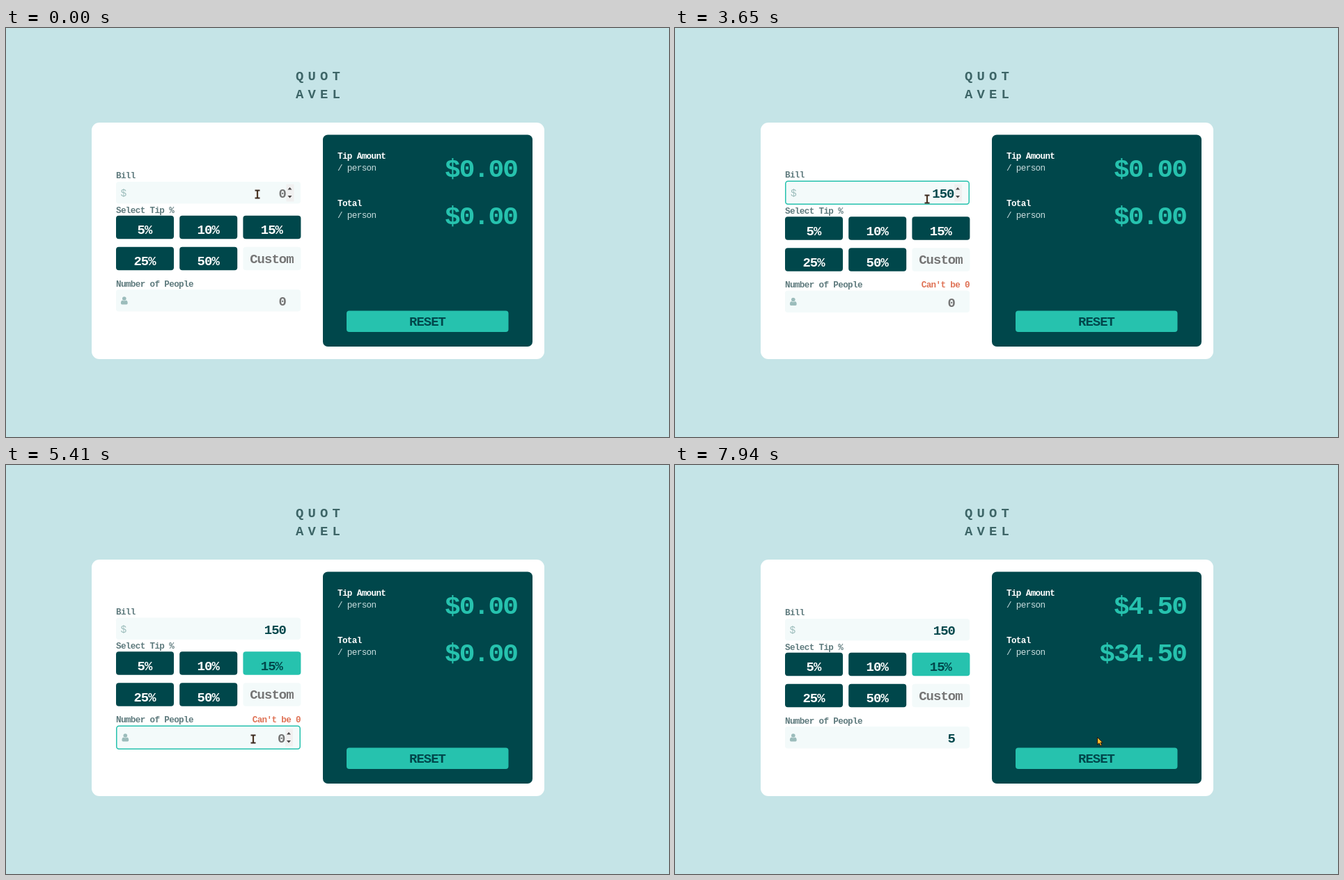
An HTML page with a canvas that plays this animation: 952 by 588 pixels, repeating every 8 s.

```html
<!DOCTYPE html>
<html lang="en">
<head>
<meta charset="utf-8">
<title>Tip calculator</title>
<style>
html, body { margin: 0; width: 100%; height: 100%; overflow: hidden; background: #c5e4e7; }
canvas { display: block; }
</style>
</head>
<body>
<canvas id="stage" width="952" height="588"></canvas>
<script>
const ctx = document.getElementById('stage').getContext('2d');
const LOOP = 8000;
const DARK = '#00474b', CYAN = '#26c2ae', PALE = '#f3fafa', LIGHT = '#9fe8df',
      LABEL = '#5e7a7d', ICON = '#9bbcbb', HINT = '#757575', ERROR = '#df7255';
const SMALL = 12.6, MEDIUM = 18.9, LARGE = 37.8;

// Stepped tracks: [start, ...values], each held until the next entry
const pointer = [
  [0, 'beam', 361, 239], [50, 'beam', 362, 238.5],
  [3650, 'beam', 362, 246], [3730, 'arrow', 362, 258], [3810, 'hand', 364, 295],
  [4290, 'hand', 363, 299], [4360, 'beam', 360, 335], [4440, 'beam', 357, 388],
  [4510, 'arrow', 353, 412], [4680, 'beam', 355, 402], [4750, 'beam', 355, 396],
  [4840, 'beam', 355, 394], [6670, 'beam', 385, 391], [6740, 'arrow', 440, 385],
  [6810, 'arrow', 520, 376], [6880, 'arrow', 590, 368], [6950, 'arrow', 614, 365],
  [7450, 'arrow', 615, 364], [7940, 'arrow', 606, 391]
];
const focus = [[0, ''], [50, 'bill'], [3880, ''], [4840, 'people'], [7520, '']];
const hover = [[0, 'bill'], [3730, ''], [4440, 'people'], [4510, ''], [4680, 'people'], [6740, '']];
const bill = [[0, ''], [2070, '1'], [2840, '15'], [2940, '150']];
const caret = [[0, 0], [110, 1], [630, 0], [1200, 1], [1660, 0], [2070, 1], [3490, 0],
  [4840, 1], [5410, 0], [5730, 1], [6230, 0], [6740, 1], [7280, 0]];

const at = (track, t) => track.findLast(k => k[0] <= t).slice(1);
const between = (t, a, b) => t >= a && t < b;

function box(x, y, w, h, r, fill) {
  ctx.fillStyle = fill;
  ctx.beginPath();
  ctx.roundRect(x, y, w, h, r);
  ctx.fill();
}

function text(str, x, y, size, color, align = 'left', weight = 'bold', tracking = -0.05) {
  ctx.font = `${weight} ${size}px "Liberation Mono", monospace`;
  ctx.letterSpacing = tracking * size + 'px';
  ctx.textAlign = align;
  ctx.fillStyle = color;
  ctx.fillText(str, x, y);
}

function shape(path, fill, stroke, width = 1) {
  const p = new Path2D(path);
  ctx.lineJoin = 'round';
  ctx.lineWidth = width;
  ctx.fillStyle = fill;
  ctx.strokeStyle = stroke;
  ctx.fill(p);
  if (stroke) ctx.stroke(p);
}

function drawPointer([kind, x, y]) {
  ctx.save();
  ctx.translate(x, y);
  if (kind === 'beam') {
    shape('M-3.5-5.5H3.5M0-5.5V5.5M-3.5 5.5H3.5', 'transparent', '#3d2b20', 2.2);
    shape('M0-4V4', 'transparent', '#7a5632', 0.6);
  } else if (kind === 'arrow') {
    shape('M.5.5V11L3 8.8 4.8 12.6 6.8 11.7 5.1 8.1H8.3Z', '#ffb92e', '#24180c');
  } else {
    shape('M-3-7Q-1.7-7.6-1.2-6L-.2-2.5 4-1.7Q6.4-1 6.2 1L5.6 4.5V7.5H-2V5.2L-5.3 1.6Q-5.6 0-4 0L-2 1.2-4-5.6Q-4.1-6.6-3-7Z',
      '#ffbc2d', '#33220f', 1.1);
  }
  ctx.restore();
}

function field(y, value, icon, focused, hovered, caretOn) {
  const inset = focused ? 1.5 : 0, right = 402 - inset;
  box(158, y, 265, 31.5 + inset * 2, 4, PALE);
  if (focused) {
    ctx.strokeStyle = CYAN;
    ctx.lineWidth = 1.5;
    ctx.beginPath();
    ctx.roundRect(158.75, y + 0.75, 263.5, 33, 3.5);
    ctx.stroke();
  }
  const top = y + inset;
  icon(inset, top);
  text(value || '0', right, top + 23, MEDIUM, value ? DARK : HINT, 'right');
  if (focused || hovered) {
    ctx.save();
    ctx.translate(right + 5.5, top);
    box(-5, 3.5, 11, 25, 0, '#f0f0f0');
    shape('M-3 11.5L0 8 3 11.5ZM-3 20L0 23.5 3 20Z', '#4a4646');
    ctx.restore();
  }
  if (focused && caretOn) box(400, top + 3, 1, 26, 0, DARK);
}

function dollar(dx, y) {
  text('$', 164.5 + dx, y + 21, 14.5, ICON, 'left', 'normal');
}

function person(dx, y) {
  ctx.save();
  ctx.translate(169.8 + dx, y + 16);
  shape('M-2.8-3A2.8 2.8 0 1 1 2.8-3A2.8 2.8 0 1 1-2.8-3Z', ICON);
  shape('M-2.6-.6Q0 1.2 2.6-.6 4.9-.2 4.9 3.5 4.9 5.5 3.2 5.5H-3.2Q-4.9 5.5-4.9 3.5-4.9-.2-2.6-.6Z', ICON);
  ctx.restore();
}

function tips(y, t) {
  const hot = between(t, 3810, 4360), chosen = t >= 4360;
  ['5%', '10%', '15%', '25%', '50%', 'Custom'].forEach((name, i) => {
    const x = 158 + (i % 3) * 91.2, top = y + (i > 2 ? 45 : 0);
    const custom = i === 5, lit = i === 2 && (hot || chosen);
    box(x, top, 83, 33.5, 4, custom ? PALE : lit ? (hot ? LIGHT : CYAN) : DARK);
    text(name, x + 41, top + (custom ? 23 : 26.5), MEDIUM, custom ? HINT : lit ? DARK : '#fff', 'center');
  });
}

function result(name, value, y) {
  text(name, 476, y, SMALL, '#fff');
  text('/ person', 476, y + 17, SMALL, '#c9dfe0', 'left', 'normal');
  text('$' + value.toFixed(2), 734, y + 26, LARGE, CYAN, 'right');
}

function draw(t) {
  const [focused] = at(focus, t), [hovered] = at(hover, t);
  const [amount] = at(bill, t), [caretOn] = at(caret, t);
  const people = t >= 5730 ? 5 : 0;
  // The focus border makes the centred form 3px taller
  const up = focused ? -1.5 : 0, down = focused === 'bill' ? 1.5 : up;

  box(0, 0, 952, 588, 0, '#c5e4e7');
  text('QUOT', 416, 75, MEDIUM, '#3d6567', 'left', 'bold', 0.325);
  text('AVEL', 416, 100.5, MEDIUM, '#3d6567', 'left', 'bold', 0.325);
  box(123, 136, 650, 340, 11, '#fff');

  text('Bill', 158, 216 + up, SMALL, LABEL);
  field(221 + up, amount, dollar, focused === 'bill', hovered === 'bill', caretOn);
  text('Select Tip %', 158, 265.5 + down, SMALL, LABEL);
  tips(269.7 + down, t);
  text('Number of People', 158, 371.5 + down, SMALL, LABEL);
  if (between(t, 2170, 5730)) text("Can't be 0", 423, 371.5 + down, SMALL, ERROR, 'right');
  field(376 + down, people ? String(people) : '', person, focused === 'people', hovered === 'people', caretOn);

  box(455, 153.5, 301, 304.5, 7, DARK);
  const tip = people ? amount * 0.15 / people : 0;
  result('Tip Amount', tip, 188);
  result('Total', people ? amount / people + tip : 0, 256);
  box(489, 406.5, 232.5, 30.5, 4, CYAN);
  text('RESET', 605, 427.5, MEDIUM, DARK, 'center');

  drawPointer(at(pointer, t));
}

const start = performance.now();
function tick() {
  draw((performance.now() - start) % LOOP);
  requestAnimationFrame(tick);
}
tick();
</script>
</body>
</html>
```
